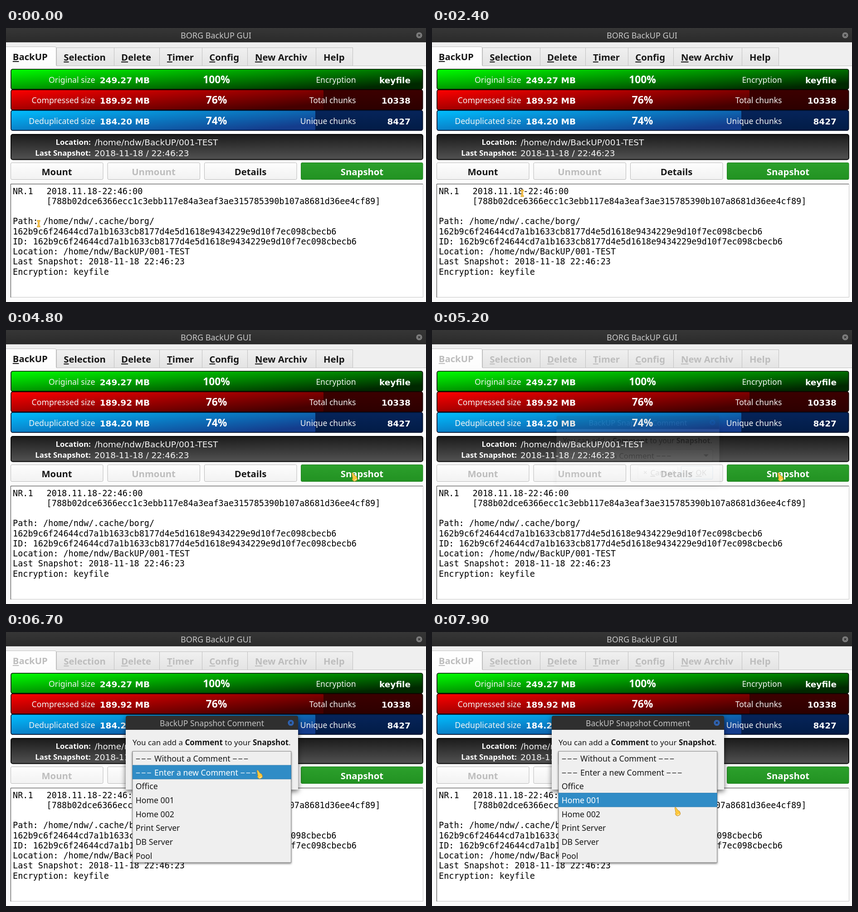
These frames come from a looping animation (926x605 px, 8000 ms). An HTML page:

```html
<!DOCTYPE html>
<html lang="en">
<head>
<meta charset="utf-8">
<title>Backup window</title>
<style>
html, body { margin: 0; width: 100%; height: 100%; overflow: hidden; background: #fcfcfc; }
svg { display: block; width: 100vw; height: 100vh; }
text { font-family: "Noto Sans", sans-serif; font-size: 17.7px; white-space: pre; }
.b { font-weight: 700; }
.big { font-weight: 700; font-size: 20.3px; }
.dv { font-family: "DejaVu Sans", sans-serif; font-size: 18.5px; }
.mono { font-family: "DejaVu Sans Mono", monospace; font-size: 18.53px; }
.u { text-decoration: underline; text-decoration-thickness: 1px; text-underline-offset: 3px; }
.dash { letter-spacing: 1.9px; }
</style>
</head>
<body>
<svg id="stage" viewBox="0 0 926 605" xmlns="http://www.w3.org/2000/svg"></svg>
<script>
const LOOP = 8000, STEP = 100;
const stage = document.getElementById('stage');
const INK = '#161616', PALE = '#bdbdbd';

const rect = (x, y, w, h, fill, more = '') =>
  `<rect x="${x}" y="${y}" width="${w}" height="${h}" fill="${fill}" ${more}/>`;
const text = (x, y, str, cls = '', fill = INK, anchor = 'start', more = '') =>
  `<text x="${x}" y="${y}" class="${cls}" fill="${fill}" text-anchor="${anchor}" ${more}>${str}</text>`;
const grad = (id, from, to, x2 = 0, y2 = 1) =>
  `<linearGradient id="${id}" x1="0" y1="0" x2="${x2}" y2="${y2}"><stop stop-color="${from}"/><stop offset="1" stop-color="${to}"/></linearGradient>`;
const underFirst = s => `<tspan class="u">${s[0]}</tspan>${s.slice(1)}`;
const dashed = s => {
  const dashes = '<tspan class="dash">\u2212\u2212\u2212</tspan>';
  return `${dashes} ${s} ${dashes}`;
};

const defs = `<defs>
  ${grad('titleBar', '#363636', '#2b2b2b')}
  ${grad('tab', '#f0f0f0', '#e4e4e4')}
  ${grad('tabOn', '#ffffff', '#fcfcfc')}
  ${grad('green', '#00ff00', '#002800', 1, .7)}
  ${grad('red', '#ff0000', '#450000', 1, .7)}
  ${grad('redRest', '#3c0000', '#2c0000')}
  ${grad('blue', '#00bfff', '#143c8c', 1, .7)}
  ${grad('blueRest', '#06245a', '#021c46')}
  ${grad('info', '#1b1b1b', '#525252')}
  ${grad('button', '#fdfdfd', '#f2f2f2')}
  ${grad('go', '#2ca02c', '#229222')}
  ${grad('goHover', '#31ae31', '#27a227')}
  ${grad('okay', '#f1f5f9', '#e0eaf2')}
  ${grad('gold', '#ffd24a', '#ffc02e', 1)}
</defs>`;

function closeDot(x, y, fill) {
  return `<circle cx="${x}" cy="${y}" r="6.6" fill="${fill}"/>
    <path d="M${x - 2.3} ${y - 2.3}l4.6 4.6m0 -4.6l-4.6 4.6" stroke="#2b2b2b" stroke-width="1.5"/>`;
}

function tabs() {
  const names = ['Selection', 'Delete', 'Timer', 'Config', 'New Archiv', 'Help'];
  const edges = [111, 238, 338, 432, 532, 683, 764];
  const starts = [127.3, 254, 355, 448.3, 549, 700];
  let out = '<path d="M111 83.5H926" stroke="#c2c2c2"/>';
  names.forEach((name, i) => {
    out += rect(edges[i] + .5, 43.5, edges[i + 1] - edges[i], 40, 'url(#tab)', 'stroke="#c0c0c0"');
    out += text(starts[i], 72, name === 'Help' ? name : underFirst(name), 'big able');
  });
  return out + `<path d="M-1 84.5V43.5Q-1 41.5 2 41.5H108Q110.5 41.5 110.5 44V84.5Z" fill="url(#tabOn)"/>
    <path d="M0 41.5H108Q110.5 41.5 110.5 44V83" fill="none" stroke="#c0c0c0"/>`
    + text(14.8, 71, underFirst('BackUP'), 'big able');
}

function bar(i, label, size, percent, label2, value, fill, rest, edge, width) {
  const pitch = 45.4, y = 91 + i * pitch, base = 121 + i * pitch;
  return rect(11, y, 907.6, 44.4, rest, 'rx="4"')
    + rect(11, y, width, 44.4, fill, 'rx="3"')
    + rect(11, y, 907.6, 44.4, 'none', `rx="4" stroke="${edge}" stroke-width="1.7"`)
    + text(196.5, base, label, '', '#f4f4f4', 'end')
    + text(206.7, base + .7, size, 'dv b', '#fff')
    + text(464, base + 1, percent, 'b', '#fff', 'middle', 'style="font-size:22.8px"')
    + text(771.5, base, label2, '', '#f4f4f4', 'end', 'style="font-size:17.5px"')
    + text(892, base + .7, value, 'dv b', '#fff', 'end');
}

function button(x, w, label, able) {
  return rect(x + .5, 297.5, w, 37, 'url(#button)', 'rx="2.5" stroke="#b9b9b9"')
    + text(x + w / 2 + .3, 324.5, label, able ? 'big able' : 'big', able ? INK : PALE, 'middle');
}

function report() {
  const hash = '162b9c6f24644cd7a1b1633cb8177d4e5d1618e9434229e9d10f7ec098cbecb6';
  const lines = ['NR.1', '', '', 'Path: /home/ndw/.cache/borg/', hash, 'ID: ' + hash,
    'Location: /home/ndw/BackUP/001-TEST', 'Last Snapshot: 2018-11-18 22:46:23', 'Encryption: keyfile'];
  const indented = ['2018.11.18-22:46:00',
    '[788b02dce6366ecc1c3ebb117e84a3eaf3ae315785390b107a8681d36ee4cf89]'];
  const put = (list, x) => list.map((s, i) => s && text(x, 366.7 + i * 22.25, s, 'mono', '#000')).join('');
  return rect(10, 344, 909, 251, '#fff')
    + '<path d="M919.5 344V594.5H10" fill="none" stroke="#c6c6c6"/><path d="M10.5 595V344.5H919" fill="none" stroke="#333"/>'
    + put(lines, 15) + put(indented, 89.6);
}

function mainWindow() {
  return rect(0, 0, 926, 605, '#fcfcfc')
    + rect(0, 31, 926, 53, '#efefef')
    + rect(0, 0, 926, 31, 'url(#titleBar)') + rect(0, 30, 926, 1.5, '#1c1c1c')
    + text(463, 23, 'BORG BackUP GUI', '', '#c9c9c9', 'middle', 'style="font-size:18px"')
    + closeDot(911, 16, '#7d7d7d')
    + tabs()
    + bar(0, 'Original size', '249.27 MB', '100%', 'Encryption', 'keyfile',
        'url(#green)', '#002800', '#001400', 907.6)
    + bar(1, 'Compressed size', '189.92 MB', '76%', 'Total chunks', '10338',
        'url(#red)', 'url(#redRest)', '#160000', 689)
    + bar(2, 'Deduplicated size', '184.20 MB', '74%', 'Unique chunks', '8427',
        'url(#blue)', 'url(#blueRest)', '#020f2a', 671)
    + rect(11, 235, 908, 55.5, 'url(#info)', 'rx="4" stroke="#050505" stroke-width="1.8"')
    + text(186.8, 258.3, 'Location:', 'b', '#fff', 'end', 'style="font-size:16.8px"')
    + text(186.8, 282, 'Last Snapshot:', 'b', '#fff', 'end', 'style="font-size:16.8px"')
    + text(195.5, 258.8, '/home/ndw/BackUP/001-TEST', 'dv', '#f6f6f6')
    + text(195, 282.7, '2018-11-18 / 22:46:23', 'dv', '#f6f6f6')
    + button(10, 203.5, 'Mount', true)
    + button(223.5, 203.5, 'Unmount', false)
    + button(437, 203.5, 'Details', true)
    + rect(650.5, 297.5, 268.5, 37, 'url(#go)', 'id="go" rx="2.5" stroke="#1c7c1c"')
    + text(785, 324.5, 'Snapshot', 'big', '#fff', 'middle')
    + report();
}

function dialog() {
  return `<g id="dialog"><g style="filter:drop-shadow(0 4px 6px rgba(0,0,0,.6))">
    ${rect(264, 200, 380, 148, '#efefef')}
    <path d="M264 216V189Q264 185 268 185H640Q644 185 644 189V216Z" fill="#2f2f2f"/></g>`
    + text(454, 208, 'BackUP Snapshot Comment', '', '#c4c4c4', 'middle', 'style="font-size:17.5px"')
    + closeDot(628, 200.5, '#2f64b4')
    + text(279, 249.5, 'You can add a <tspan class="b">Comment</tspan> to your <tspan class="b">Snapshot</tspan>.',
        '', INK, 'start', 'style="font-size:17px"')
    + rect(278.5, 263.5, 350, 29.5, 'url(#button)', 'rx="2" stroke="#b4b4b4"')
    + text(283, 285, dashed('Without a Comment'))
    + '<path d="M607 275H619L613 281Z" fill="#4a4a4a"/>'
    + rect(454, 302.5, 92.5, 30.5, 'url(#button)', 'rx="2" stroke="#b4b4b4"')
    + '<path d="M468 314l6.4 6.4m0 -6.4l-6.4 6.4" stroke="#555" stroke-width="1.4"/>'
    + text(483, 324.5, underFirst('Cancel'))
    + rect(555, 302.5, 73.5, 30.5, 'url(#okay)', 'rx="2" stroke="#3b7fb5" stroke-width="1.2"')
    + '<path d="M572 318l3.6 3.6l7.6 -7.8" fill="none" stroke="#555" stroke-width="1.4"/>'
    + text(589, 324.5, underFirst('OK')) + '</g>';
}

const ROW = 30.65, LIST_TOP = 263.5;
function popup() {
  const items = [dashed('Without a Comment'), dashed('Enter a new Comment'), 'Office',
    'Home 001', 'Home 002', 'Print Server', 'DB Server', 'Pool'];
  return '<g id="popup">'
    + rect(279, LIST_TOP, 349.5, 245.5, '#efefef', 'stroke="#8a8a8a" style="filter:drop-shadow(0 2px 2px rgba(0,0,0,.5))"')
    + rect(279, 0, 349.5, ROW, '#308cc6', 'id="mark" stroke="#2a78aa" stroke-width=".8"')
    + items.map((s, i) => text(285.7, 286 + i * ROW, s, 'item')).join('') + '</g>';
}

const cursors = `
  <g id="beam"><path d="M-3.2 -7.5H3.2V-4.8H1.6V4.8H3.2V7.5H-3.2V4.8H-1.6V-4.8H-3.2Z"
    fill="#f7c548" stroke="#d39a2c" stroke-width=".8"/></g>
  <g id="hand"><path d="M-.6 .8Q0 -.6 1.6 .4L6.2 6.8L9.6 8.6L11.6 13.2L10.8 16.6L5.6 19.2L2.4 18L.2 14.6L1.4 12.4Z"
    fill="url(#gold)" stroke="#bd8424" stroke-width=".9" stroke-linejoin="round"/>
    <path d="M4.6 17.4L9.6 14.8" stroke="#fff0b8" stroke-width="1.6"/></g>`;

stage.innerHTML = defs + mainWindow() + dialog() + popup() + cursors;
const $ = id => document.getElementById(id);
const go = $('go'), dlg = $('dialog'), list = $('popup'), mark = $('mark'), beam = $('beam'), hand = $('hand');
const ables = stage.querySelectorAll('.able'), items = stage.querySelectorAll('.item');

// Pointer path: time, x, y; repeated places are rests.
const path = [
  [0, 72, 432], [100, 72, 432], [300, 81, 431], [500, 66, 402], [800, 20, 363], [1000, 18, 361],
  [1300, 32, 376], [1500, 46, 381], [1700, 63, 362], [1900, 60, 352],
  [2000, 100, 376], [2200, 286, 380], [2300, 250, 372], [2400, 199, 365], [2800, 199, 365],
  [2900, 430, 372], [3200, 430, 372], [3300, 445, 370], [3700, 640, 352], [4000, 768, 332],
  [4100, 765.5, 328], [4300, 765.5, 328], [4500, 763, 315], [5200, 763, 315], [5300, 752, 313],
  [5400, 752, 313], [5800, 593, 288], [6100, 586, 285], [6400, 586, 285], [6700, 554, 305],
  [6900, 552, 315], [7000, 552, 315], [7900, 536, 387]
];

function pointer(t) {
  const i = path.findIndex(p => p[0] >= t);
  if (i < 1) return path[i < 0 ? path.length - 1 : 0].slice(1);
  const [t0, x0, y0] = path[i - 1], [t1, x1, y1] = path[i];
  const k = (t - t0) / (t1 - t0);
  return [x0 + (x1 - x0) * k, y0 + (y1 - y0) * k];
}

const show = (el, on) => el.setAttribute('display', on ? 'inline' : 'none');

function draw(ms) {
  const t = Math.floor(ms / STEP) * STEP;
  const [x, y] = pointer(t);
  const isHand = t >= 3800;
  show(beam, !isHand);
  show(hand, isHand);
  (isHand ? hand : beam).setAttribute('transform', `translate(${x} ${y})`);

  go.setAttribute('fill', t >= 4800 && t < 5000 ? '#1f861f' : t >= 4000 && t < 4800 ? 'url(#goHover)' : 'url(#go)');
  ables.forEach(el => el.setAttribute('fill', t >= 5000 ? PALE : INK));

  show(dlg, t >= 5100);
  const opening = t < 5300;
  dlg.setAttribute('opacity', !opening ? 1 : t < 5200 ? .02 : .1);
  dlg.setAttribute('transform', opening ? 'translate(454 267) scale(.945) translate(-454 -267)' : '');

  const open = t >= 6000;
  show(list, open);
  if (open) {
    // The highlight trails the pointer by one step.
    const row = Math.floor((pointer(t - STEP)[1] - LIST_TOP) / ROW);
    mark.setAttribute('y', LIST_TOP + row * ROW);
    items.forEach((el, i) => el.setAttribute('fill', i === row ? '#fff' : INK));
  }
}

const start = performance.now();
function tick() {
  draw((performance.now() - start) % LOOP);
  requestAnimationFrame(tick);
}
tick();
</script>
</body>
</html>
```
